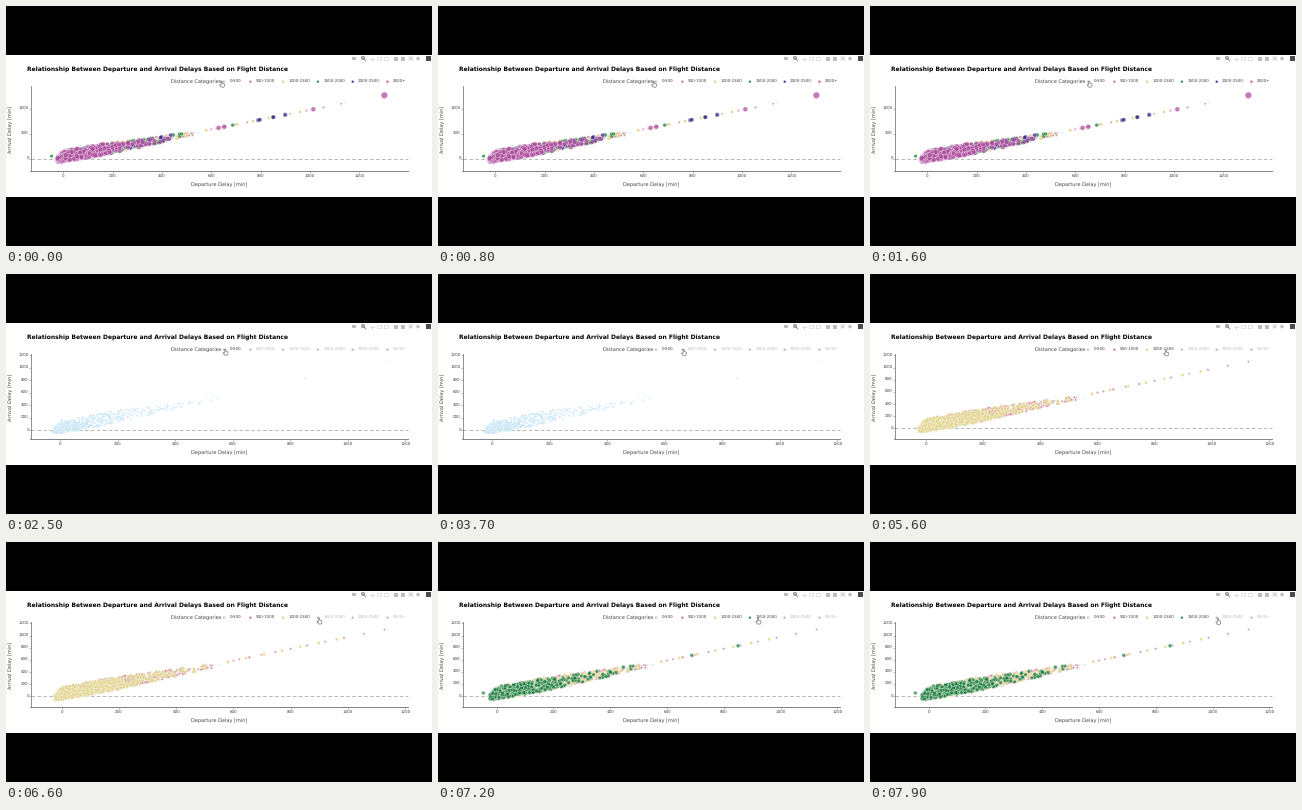
Write a matplotlib script that moves like this. It is 426x240 px and loops after 8000 ms.

```python
import numpy as np
import matplotlib.pyplot as plt
from matplotlib.animation import FuncAnimation
from matplotlib.collections import LineCollection
from matplotlib.patches import Circle, Polygon, Rectangle

W, H, DPI = 426, 240, 100
PX = 72 / DPI  # points per pixel
FRAMES, STEP = 80, 100
INK, GREY = "#444444", "#bdbdbd"

plt.rcParams.update({"font.family": "DejaVu Sans", "text.hinting": "none",
                     "text.hinting_factor": 1})
fig = plt.figure(figsize=(W / DPI, H / DPI), dpi=DPI, facecolor="black")
ax = fig.add_axes([0, 0, 1, 1])
ax.set(xlim=(0, W), ylim=(H, 0))
ax.axis("off")


def label(x, y, s, size, color=INK, ha="center", va="baseline", **kw):
    return ax.text(x, y, s, fontsize=size * PX, color=color, ha=ha, va=va, **kw)


def line(xs, ys, color, width, **kw):
    return ax.plot(xs, ys, color=color, lw=width * PX, **kw)[0]


def patch(shape):
    return ax.add_patch(shape)


patch(Rectangle((0, 49), W, 142, color="white", lw=0, zorder=0))

# ---- data: delays inside a band that narrows along the diagonal ----------
NAMES = ["0-500", "500-1000", "1000-1500", "1500-2000", "2000-2500", "2500+"]
COLORS = ["#88CCEE", "#CC6677", "#DDCC77", "#117733", "#332288", "#AA4499"]
COUNTS = [800, 1000, 950, 480, 200, 430]
KNOTS = [-30, 0, 160, 450, 1150]
LOW = [-30, -55, -85, -65, -25]
HIGH = [25, 150, 140, 35, -5]
FAR = [[852, 1141], 600 + 527 * np.linspace(0, 1, 11) ** 1.4, np.linspace(580, 960, 7),
       [-47, 687, 850], [790, 797, 852, 900], [630, 653, 1014, 1302]]

rng = np.random.default_rng(7)


def cloud(i):
    """Truncated exponential departures plus a few far ones."""
    n, scale, cap = COUNTS[i], 145 - 8 * i, 580 - 25 * i
    u = rng.random(n) * (1 - np.exp(-cap / scale))
    dep = -24 - scale * np.log(1 - u)
    low, high = np.interp(dep, KNOTS, LOW), np.interp(dep, KNOTS, HIGH)
    arr = dep + low + (high - low) * rng.beta(1.1, 1.5, n)
    far = np.asarray(FAR[i])
    return np.append(dep, far), np.append(arr, 0.97 * np.abs(far) + 5)


data, dots = [], []
for i, color in enumerate(COLORS):
    dep, arr = cloud(i)
    miles = 500 * i + rng.uniform(150, 500, len(dep))
    miles[dep > 1200] = 5000
    radius = 3.3 * (miles / 5000) ** 0.58
    data.append((dep, arr))
    dots.append(ax.scatter(dep, arr, s=(2 * radius * PX) ** 2, c=color, alpha=0.7,
                           edgecolors="white", linewidths=0.42 * PX, zorder=4 + i / 10))

# ---- fixed labels and axes -------------------------------------------------
label(21, 64.4, "Relationship Between Departure and Arrival Delays Based on Flight Distance",
      6.45, "black", "left", weight="bold")
label(213, 180.3, "Departure Delay [min]", 4.65)
label(5, 123, "Arrival Delay [min]", 4.5, va="center", rotation=90)
label(165, 77.2, "Distance Categories", 4.88, ha="left")
line([24.5, 24.5], [80, 165.4], "#777777", 0.8, zorder=6)
line([24.2, 402], [165, 165], "#777777", 0.9, zorder=6)
zero = line([25, 402], [0, 0], "#b0b0b0", 0.9, dashes=(4, 2.6), zorder=3)
ticks = LineCollection([], colors="#888888", linewidths=0.6 * PX, zorder=6)
ax.add_collection(ticks)
x_text = [label(0, 172.2, "", 4.35) for _ in range(7)]
y_text = [label(22.8, 0, "", 4.35, ha="right", va="center_baseline") for _ in range(7)]

# ---- legend: each entry is as wide as its name needs -------------------------
key_x = 218 + np.cumsum([0] + [15.9 + 2.1 * len(s) for s in NAMES[:-1]])
keys = []
for x, name in zip(key_x, NAMES):
    dot = patch(Circle((x, 75.7), 1.25, lw=0, alpha=0.8, zorder=7))
    keys.append((dot, label(x + 5.4, 77.2, name, 4.15, ha="left")))

# ---- toolbar -----------------------------------------------------------------
patch(Rectangle((345.8, 51), 4.4, 3.2, color=GREY, lw=0))
patch(Circle((357, 52), 1.5, fc=GREY, ec="#888888", lw=0.9 * PX))
line([358, 359.5], [53, 54.6], "#888888", 1)
line([363.6, 367.6], [52.5, 52.5], "#d4d4d4", 0.8)
line([365.6, 365.6], [50.5, 54.5], "#d4d4d4", 0.8)
for x in (373, 380):
    patch(Rectangle((x - 1.7, 50.8), 3.4, 3.4, fill=False, ec="#d4d4d4", lw=0.7 * PX))
for x in (390, 397.3):
    patch(Rectangle((x - 2, 50.6), 4, 4, color=GREY, lw=0))
for s in (-1, 1):
    line([403, 406.4], [52.5 - 1.7 * s, 52.5 + 1.7 * s], GREY, 0.9)
patch(Polygon([(409.8, 52.6), (412, 50.4), (414.2, 52.6), (412, 54.8)], color=GREY, lw=0))
patch(Rectangle((420, 50), 5, 5, color="#4a4c55", lw=0))

# ---- pointer -------------------------------------------------------------------
HAND = np.array([(-0.7, -2.9), (0.3, -2.9), (0.4, -0.7), (2.4, -0.1), (2.5, 1.4),
                 (1.8, 3.1), (-1.0, 3.1), (-2.5, 0.6), (-0.8, 0.9)])
hand = patch(Polygon(HAND, fc="white", ec="#777777", lw=0.7 * PX, zorder=9))
STOPS = np.append(216, key_x[:5] + 1.5)
MOVES = np.array([1.2, 3.15, 4.4, 5.6, 7.35])  # middle of each move, s


def pointer(t):
    u = np.clip((t - MOVES) / 0.7 + 0.5, 0, 1)
    ease = u * u * (3 - 2 * u)
    return STOPS[0] + np.diff(STOPS) @ ease, 78 + 0.3 * ease[1:].sum()


# click time, shown categories, pixel of x = 0, 1200 and y = 0, 1000, y step
VIEWS = [
    (0.0, 6, 57.2, 353.2, 152.7, 102.7, 500),
    (1.7, 1, 54.2, 399.4, 156.1, 93.7, 200),
    (4.0, 2, 54.2, 399.4, 154.7, 93.6, 200),
    (5.0, 3, 55.6, 399.4, 154.3, 93.5, 200),
    (6.8, 4, 58.7, 399.4, 154.0, 93.5, 200),
]


def set_labels(texts, values, spots, move):
    for text in texts:
        text.set_text("")
    for text, value, spot in zip(texts, values, spots):
        text.set_text(str(value))
        move(text, spot)


def draw(n):
    t = n * STEP / 1000
    _, count, x0, x1, y0, y1, step = [v for v in VIEWS if v[0] <= t + 1e-9][-1]

    def to_x(v):
        return x0 + (x1 - x0) * v / 1200

    def to_y(v):
        return y0 + (y1 - y0) * v / 1000

    for i, ((dep, arr), coll) in enumerate(zip(data, dots)):
        coll.set_visible(i < count)
        coll.set_offsets(np.column_stack([to_x(dep), to_y(arr)]))
    for i, (dot, text) in enumerate(keys):
        dot.set_facecolor(COLORS[i] if i < count else "#b4b2b8")
        text.set_color(INK if i < count else GREY)

    xv, yv = np.arange(0, 1201, 200), np.arange(0, 1201, step)
    xs, ys = to_x(xv), to_y(yv)
    set_labels(x_text, xv, xs, plt.Text.set_x)
    set_labels(y_text, yv, ys, plt.Text.set_y)
    ticks.set_segments([[(x, 165), (x, 166.5)] for x in xs]
                       + [[(23.2, y), (24.5, y)] for y in ys])
    zero.set_ydata([y0, y0])
    hand.set_xy(HAND + pointer(t))
    return []


anim = FuncAnimation(fig, draw, frames=FRAMES, interval=STEP, repeat=True,
                     repeat_delay=0, blit=False)
plt.show()
```
